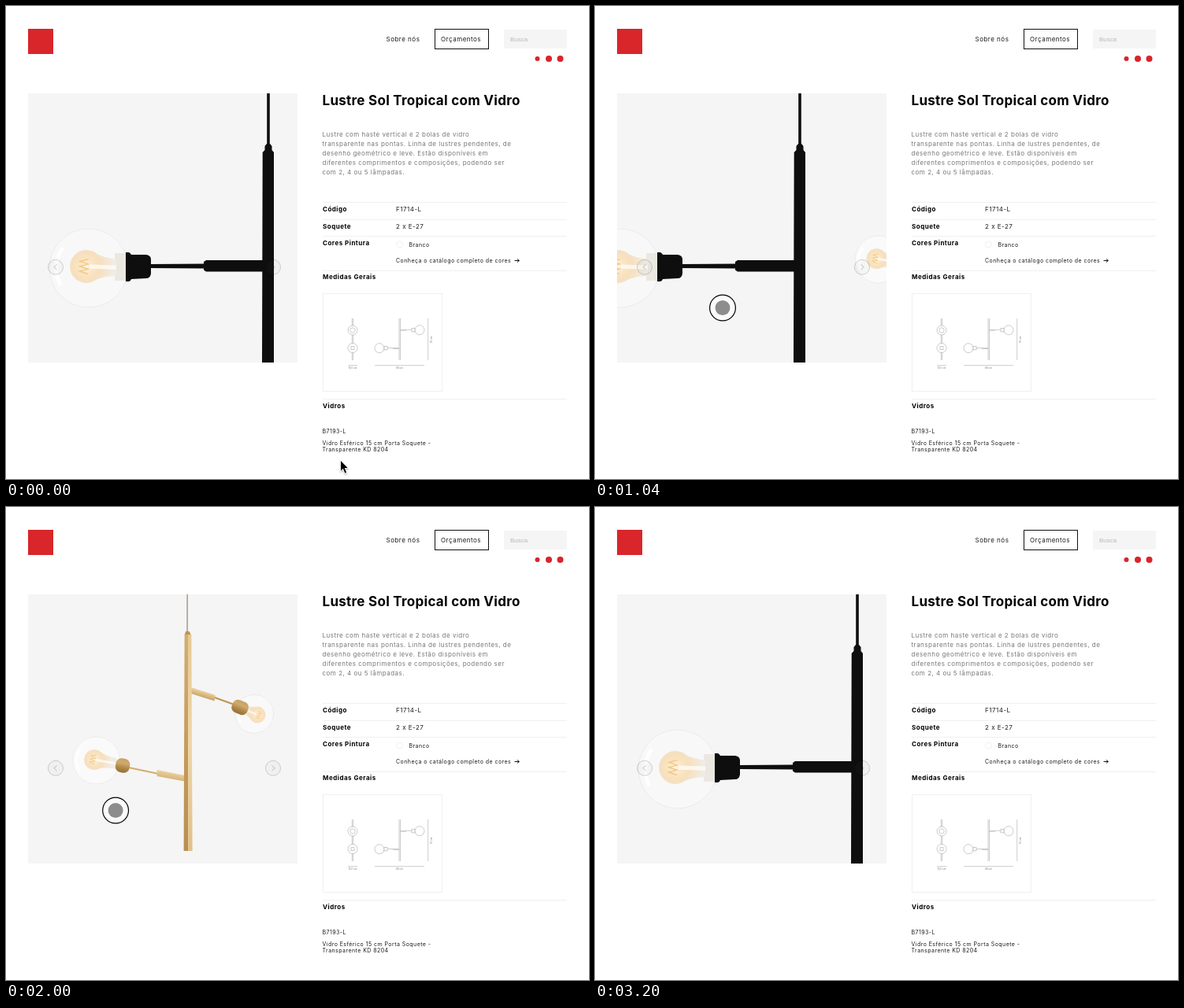
Recreate the animation shown at these times as an HTML page with a canvas. Size 740 by 601 pixels, loop 3760 ms.

```html
<!DOCTYPE html>
<html lang="pt">
<head>
<meta charset="utf-8">
<title>Lustre</title>
<style>
  html, body { margin: 0; width: 740px; height: 601px; overflow: hidden; background: #fff; }
  svg, canvas { position: absolute; left: 0; top: 0; display: block; }
  text { font-family: Inter, "Open Sans", sans-serif; font-size: 8px; letter-spacing: .5px; fill: #1a1a1a; white-space: pre; }
  .title { font-size: 17px; font-weight: 700; letter-spacing: .28px; fill: #000; }
  .bold { font-weight: 700; fill: #000; }
  .soft { fill: #777; }
  .small { font-size: 7px; letter-spacing: .45px; }
  .search { font-family: "Liberation Sans", Arial, sans-serif; letter-spacing: 0; fill: #b8b8b8; }
  .dim { font-size: 3px; letter-spacing: 0; fill: #777; text-anchor: middle; }
  .rule { fill: none; stroke: #f0f0f0; }
  .plan { fill: none; stroke: #aaa; stroke-width: .6; }
</style>
</head>
<body>
<svg width="740" height="601" viewBox="0 0 740 601">
  <rect x="28" y="29" width="32" height="32" fill="#d8262b"/>
  <text x="482.5" y="45">Sobre nós</text>
  <rect x="544.5" y="29.5" width="68" height="25" fill="none" stroke="#111"/>
  <text x="552" y="45">Orçamentos</text>
  <rect x="632" y="30" width="80" height="24" fill="#f5f5f5"/>
  <text class="search" x="640" y="45">Busca</text>
  <g fill="#d8262b">
    <circle cx="674.5" cy="67" r="3"/><circle cx="689" cy="67" r="4"/><circle cx="703.5" cy="67" r="4"/>
  </g>

  <text class="title" x="401.5" y="125.5">Lustre Sol Tropical com Vidro</text>
  <text class="soft" x="401.5" y="166">Lustre com haste vertical e 2 bolas de vidro</text>
  <text class="soft" x="401.5" y="178">transparente nas pontas. Linha de lustres pendentes, de</text>
  <text class="soft" x="401.5" y="190">desenho geométrico e leve. Estão disponíveis em</text>
  <text class="soft" x="401.5" y="202">diferentes comprimentos e composições, podendo ser</text>
  <text class="soft" x="401.5" y="214">com 2, 4 ou 5 lâmpadas.</text>

  <path class="rule" d="M402 249.5H712M402 271.5H712M402 292.5H712M402 336.5H712M402 499.5H712"/>
  <text class="bold" x="402" y="261">Código</text>
  <text x="495" y="261">F1714-L</text>
  <text class="bold" x="402" y="282.5">Soquete</text>
  <text x="495" y="282.5">2 x E-27</text>
  <text class="bold" x="402" y="304">Cores Pintura</text>
  <circle class="rule" cx="499.5" cy="303" r="4"/>
  <text class="small" x="511.5" y="305.5">Branco</text>
  <text class="small" x="495" y="326">Conheça o catálogo completo de cores</text>
  <path d="M645.5 323.5H651M649 321.5L651.5 323.5L649 325.5" fill="none" stroke="#1a1a1a"/>
  <text class="bold" x="402" y="347">Medidas Gerais</text>

  <rect class="rule" x="402.5" y="365.5" width="151" height="124"/>
  <g class="plan">
    <path d="M439.3 397V450M440.7 397V450M499 397V450M500.5 397V450"/>
    <g fill="#fff">
      <circle cx="440" cy="412" r="6"/><circle cx="440" cy="412" r="3.2"/>
      <circle cx="440" cy="434.5" r="6"/><rect x="438" y="432.7" width="4" height="4"/>
      <circle cx="525" cy="411.7" r="6"/><rect x="515" y="409.5" width="4" height="4.4"/>
      <circle cx="474" cy="434.7" r="6"/><rect x="480" y="432.5" width="4" height="4.4"/>
    </g>
    <path d="M500.5 411.3H515M500.5 412.3H508M484 434.5H499M491 435.5H499"/>
    <path d="M434 456.7H446M468 456.7H531M535.7 397V450"/>
  </g>
  <text class="dim" x="440" y="461">15,0 cm</text>
  <text class="dim" x="499.5" y="461">66 cm</text>
  <text class="dim" transform="translate(541 424) rotate(-90)">70 cm</text>

  <text class="bold" x="402" y="511">Vidros</text>
  <text class="small" x="401.5" y="542.5">B7193-L</text>
  <text class="small" x="401.5" y="557.5">Vidro Esférico 15 cm Porta Soquete -</text>
  <text class="small" x="401.5" y="565.5">Transparente KD 8204</text>
</svg>
<canvas id="view" width="740" height="601"></canvas>
<script>
const ctx = document.getElementById('view').getContext('2d');
const LOOP = 3760, STEP = 80, SIZE = 342, SLACK = 16, SETTLE = 30;

const easeIn = u => u * u;
const easeOut = u => u * (2 - u);
const smooth = u => u * u * (3 - 2 * u);
const mix = (a, b, k) => a + (b - a) * k;

const home = { x: 424.5, y: 577 };
const moves = [
  { from: 80, to: 560, x: 251, y: 383, ease: smooth },
  { from: 800, to: 1280, x: 73, y: 384, ease: smooth },
  { from: 1280, to: 1680, x: 99.5, y: 385, ease: smooth },
  { from: 1840, to: 2480, x: 353, y: 388, ease: smooth },
  { from: 2480, to: 2720, x: 381.5, y: 482.5, ease: easeIn },
  { from: 2720, to: 3200, x: 408, y: 595, ease: easeOut }
];
const swipes = [
  { down: 720, up: 1040, start: 0, end: SIZE },
  { down: 1840, up: 2320, start: SIZE, end: 0 }
];

function pointer(t) {
  let { x, y } = home;
  for (const m of moves) {
    if (t <= m.from) break;
    const k = m.ease(Math.min(1, (t - m.from) / (m.to - m.from)));
    x = mix(x, m.x, k);
    y = mix(y, m.y, k);
  }
  return { x, y };
}

// follows the finger after a little slack, then settles on a slide
function scroll(t) {
  const s = swipes.filter(s => s.down <= t).pop();
  if (!s) return 0;
  const dx = pointer(Math.min(t, s.up)).x - pointer(s.down).x;
  const held = s.start - Math.sign(dx) * Math.max(0, Math.abs(dx) - SLACK);
  return t <= s.up ? held : mix(s.end, held, Math.exp((s.up - t) / SETTLE));
}

function shape(d, fill) {
  ctx.fillStyle = fill;
  ctx.fill(new Path2D(d));
}

function stroke(d, color, width = 1) {
  ctx.strokeStyle = color;
  ctx.lineWidth = width;
  ctx.stroke(new Path2D(d));
}

function disc(x, y, r, fill, edge, width = 1) {
  ctx.beginPath();
  ctx.arc(x, y, r, 0, 7);
  if (fill) { ctx.fillStyle = fill; ctx.fill(); }
  if (edge) { ctx.strokeStyle = edge; ctx.lineWidth = width; ctx.stroke(); }
}

function fade(gradient, ...colors) {
  colors.forEach((c, i) => gradient.addColorStop(i / (colors.length - 1), c));
  return gradient;
}
const ramp = (x1, y1, x2, y2, ...colors) => fade(ctx.createLinearGradient(x1, y1, x2, y2), ...colors);
const glow = (r, ...colors) => fade(ctx.createRadialGradient(0, 0, 0, 0, 0, r), ...colors);

function at(x, y, angle, paint) {
  ctx.save();
  ctx.translate(x, y);
  ctx.rotate(angle);
  paint();
  ctx.restore();
}

function globe(x, y, r, white) {
  at(x, y, 0, () => {
    disc(0, 0, r, `rgba(255,255,255,${white})`);
    disc(0, 0, r - .5, null, 'rgba(225,225,225,.6)');
    ctx.beginPath();
    ctx.arc(0, 0, r * .82, 2.6, 3.8);
    ctx.strokeStyle = 'rgba(255,255,255,.8)';
    ctx.lineWidth = r * .1;
    ctx.stroke();
  });
}

// pear-shaped lamp whose neck points along the angle
function bulb(x, y, r, angle, neck) {
  at(x, y, angle, () => {
    ctx.beginPath();
    ctx.arc(0, 0, r, .9, -.9);
    ctx.quadraticCurveTo(r, -r * .58, neck, -r * .5);
    ctx.lineTo(neck, r * .5);
    ctx.quadraticCurveTo(r, r * .58, r * .62, r * .78);
    ctx.fillStyle = glow(r * 1.7, '#fff6e2', '#fbe5c2', '#f6dfbd', '#f3e6d2', '#f1ece3');
    ctx.fill();
    ctx.beginPath();
    for (let i = -3; i <= 3; i++) ctx.lineTo((i % 2 ? .1 : -.4) * r, i * r * .15);
    ctx.strokeStyle = '#f4c887';
    ctx.lineWidth = r * .07;
    ctx.stroke();
    ctx.fillStyle = 'rgba(255,255,255,.7)';
    ctx.fillRect(r * .2, -r * .12, neck - r * .2, r * .24);
  });
}

function blackLamp() {
  const ink = '#0e0e0e';
  globe(105, 333, 50.5, .3);
  shape('M138 314h15v35h-15z', '#ebe8e2');
  bulb(102, 331, 21, .03, 38);
  shape('M152 313h4q2 1 3 3h19q6 1 6 6v18q-1 6-6 6l-19 1q-1 3-3 3h-4z', ink);
  shape('M183 328l69-.5v6l-69-.5z', ink);
  shape('M251 325l3-2h73v14.5h-73l-3-2z', ink);
  stroke('M333 111V177', ink, 3.6);
  shape('M331 175h4l2.5 3v5l2.5 3V453H325l.7-267 2.8-3v-5z', ink);
}

function goldSocket(x, y, angle, w, h) {
  at(x, y, angle, () => {
    ctx.beginPath();
    ctx.roundRect(-w / 2, -h / 2, w, h, h * .4);
    ctx.fillStyle = ramp(0, -h / 2, 0, h / 2, '#c8a365', '#cfaa6c', '#b08748', '#94703a');
    ctx.fill();
  });
}

function goldLamp() {
  const pale = '#efd6a8', mid = '#d3ad70', deep = '#bf9552';
  stroke('M206.5 111V159', '#b3a094', 1.7);
  stroke('M241 242L266 251', deep, 2);
  shape('M211 229L242 239L241 246.5L211 237z', ramp(212, 229, 209, 240, pale, deep));
  globe(291.5, 263, 25, .35);
  bulb(295.5, 264, 10.5, Math.PI + .4, 17);
  goldSocket(273.5, 254.5, .4, 21, 17);

  stroke('M132 331L170 339', mid, 2.2);
  shape('M168 334L208 342V349.5L168 342z', ramp(187, 336, 185, 347, pale, mid));
  globe(91, 322, 30.5, .55);
  bulb(88.5, 321, 13, .18, 28);
  goldSocket(124.5, 328.5, .18, 18, 18);

  shape('M204.5 158H209L211.5 163H203z', deep);
  shape('M203 162H207.5V437H202z', ramp(0, 162, 0, 437, mid, '#c49c5c', '#b98f50'));
  shape('M207.5 162H211.7L213 437H207.5z', ramp(0, 162, 0, 437, '#e6c990', pale, '#dfc08a'));
}

function button(x, dir) {
  const edge = 'rgba(0,0,0,.17)';
  at(x, 331.8, dir < 0 ? Math.PI : 0, () => {
    disc(0, 0, 9.5, 'rgba(128,128,128,.04)', edge);
    stroke('M-1.5-3.5L2 0L-1.5 3.5', edge, 1.1);
  });
}

function carousel(offset) {
  ctx.save();
  ctx.beginPath();
  ctx.rect(28, 111, SIZE, SIZE);
  ctx.clip();
  ctx.fillStyle = '#f5f5f5';
  ctx.fillRect(28, 111, SIZE, SIZE);
  ctx.translate(-offset, 0);
  blackLamp();
  ctx.translate(SIZE, 0);
  goldLamp();
  ctx.restore();
  button(63, -1);
  button(339, 1);
}

function arrow({ x, y }) {
  const d = 'M.5 1V13.4L3.4 10.8L5.8 16.6L7.6 15.8L5.2 10.1L9.2 10z';
  at(x, y, 0, () => {
    ctx.shadowColor = 'rgba(0,0,0,.35)';
    ctx.shadowBlur = 2;
    ctx.shadowOffsetY = 1;
    stroke(d, '#fff', 1.6);
    ctx.shadowColor = 'transparent';
    shape(d, '#000');
  });
}

function touch({ x, y }, pressed) {
  if (pressed) disc(x, y, 16.4, 'rgba(255,255,255,.6)', '#000', 1.2);
  disc(x, y, 10.6, 'rgba(255,255,255,.7)');
  disc(x, y, 9.5, '#8d8d8d');
}

function draw(now) {
  const t = Math.floor(now % LOOP / STEP) * STEP;
  ctx.clearRect(0, 0, 740, 601);
  carousel(scroll(t));
  if (t < 80) arrow(home);
  else if (t < 3200) touch(pointer(t), swipes.some(s => t >= s.down && t <= s.up));
}

let start;
function tick(now) {
  start ??= now;
  draw(now - start);
  requestAnimationFrame(tick);
}
draw(0);
requestAnimationFrame(tick);
</script>
</body>
</html>
```
